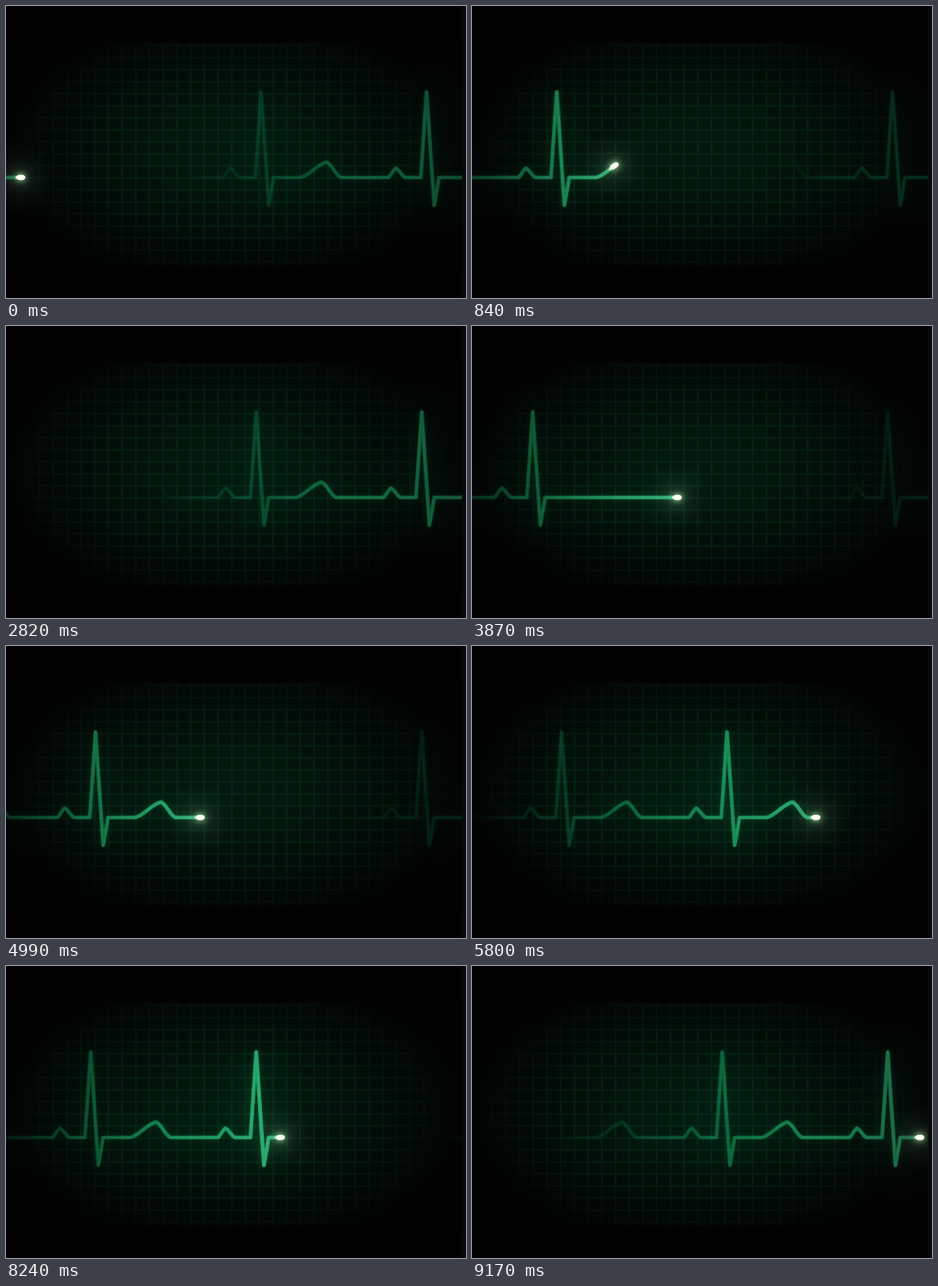
An HTML page with a canvas for the animation above (9.27 s loop, 478 px wide and 304 px high).

```html
<!DOCTYPE html>
<html lang="en">
<head>
<meta charset="utf-8">
<title>Heart monitor</title>
<style>
  html, body { margin: 0; width: 100%; height: 100%; overflow: hidden; background: #020203; }
  .stage { position: relative; width: 478px; height: 304px; overflow: hidden; background: #020203; }
  .screen { position: absolute; left: 0; top: 38px; width: 474px; height: 233px; background: #020404; }
  .edge { position: absolute; left: 474px; top: 0; width: 4px; height: 304px; background: #09090b; }
  .tint, .grid { position: absolute; inset: 0; }
  .tint { background: radial-gradient(ellipse 230px 130px at 238px 112px, #02190f 0, #02150c 35%, #020a06 75%, transparent 100%); }
  .grid {
    opacity: .42;
    background:
      repeating-linear-gradient(90deg, transparent 0 5px, #0d3a25 6.3px 6.9px, transparent 8.2px 14.25px),
      repeating-linear-gradient(180deg, transparent 0 1.6px, #0d3a25 2.9px 3.5px, transparent 4.8px 12.52px);
    -webkit-mask-image: radial-gradient(ellipse 228px 140px at 234px 114px, #000 0, rgba(0,0,0,.8) 55%, rgba(0,0,0,.3) 90%, transparent 100%);
    mask-image: radial-gradient(ellipse 228px 140px at 234px 114px, #000 0, rgba(0,0,0,.8) 55%, rgba(0,0,0,.3) 90%, transparent 100%);
  }
  canvas { position: absolute; left: 0; top: 0; mix-blend-mode: screen; }
</style>
</head>
<body>
<div class="stage">
  <div class="screen"><div class="tint"></div><div class="grid"></div></div>
  <div class="edge"></div>
  <canvas width="478" height="304"></canvas>
</div>
<script>
const ctx = document.querySelector('canvas').getContext('2d');
const LOOP = 9270, FADE = 1950, WIDTH = 474, BASE = 178.5, BEAT = 172;

// Picture changes: [time, equal steps until the next entry]
const ticks = [
  [0, 1], [150, 7], [1140, 1], [1260, 4], [1750, 1], [1890, 3], [2280, 1],
  [2430, 7], [3360, 1], [3490, 3], [3870, 1], [3990, 3], [4420, 1],
  [4570, 7], [5530, 1], [5680, 1], [5800, 1], [5960, 5], [6580, 1],
  [6730, 4], [7220, 1], [7360, 2], [7640, 1], [7790, 3], [8240, 1],
  [8360, 3], [8750, 1], [8900, 2], [9170, 1], [LOOP, 1]
];

// start: time at x = 0, speed: px per ms, peak: x of the first spike
const sweep = (start, speed, peak, flat = false) => ({ start, speed, peak, flat });
const before = sweep(-2934, .19, 93);
const first = sweep(-86, .1851, 88);
const flatline = sweep(2744, .19, 63, true);
const middle = sweep(3916, .19, 93);
const last = sweep(6766, .1938, 88);

// [from, current sweep, fading sweep]
const scenes = [
  [0, first, before],
  [2700, flatline, first],
  [4570, middle, sweep(1134, .19, 88)],
  [6715, last, middle]
];

// One beat, relative to its spike: [dx, height]
const spike = [[-6, 0], [0, 89], [8, -29], [13, 0]];

function bump(d, from, top, to, height) {
  if (d <= from || d >= to) return 0;
  const k = d < top ? (d - from) / (top - from) : (to - d) / (to - top);
  return height * (.45 * k + .55 * Math.sin(k * Math.PI / 2) ** 2);
}

function lift(x, s) {
  let d = x - s.peak;
  if (s.flat && d > 13) return 0;
  d = ((d + 40) % BEAT + BEAT) % BEAT - 40;
  for (let i = 1; i < spike.length; i++) {
    const [x0, y0] = spike[i - 1], [x1, y1] = spike[i];
    if (d >= x0 && d <= x1) return y0 + (y1 - y0) * (d - x0) / (x1 - x0);
  }
  return bump(d, -40, -32, -22, 9.5) + bump(d, 41, 68, 83, 16);
}

function trace(s, from, to) {
  ctx.beginPath();
  ctx.moveTo(from, BASE - lift(from, s));
  for (let x = Math.floor(from) + 1; x < to; x++) ctx.lineTo(x, BASE - lift(x, s));
  ctx.lineTo(to, BASE - lift(to, s));
}

function stroke(style, width, glow, blur) {
  ctx.strokeStyle = style;
  ctx.lineWidth = width;
  ctx.shadowColor = glow;
  ctx.shadowBlur = blur;
  ctx.stroke();
}

// Only the blurred shadow of the path, which itself lies off the canvas
function halo(s, from, to, width, glow, blur) {
  ctx.save();
  ctx.translate(0, -1000);
  ctx.shadowOffsetY = 1000;
  trace(s, from, to);
  stroke('#fff', width, glow, blur);
  ctx.restore();
}

function trail(s, t, from, to) {
  if (to <= from) return;
  const head = (t - s.start) * s.speed;
  const fade = ctx.createLinearGradient(head - FADE * s.speed, 0, head, 0);
  fade.addColorStop(0, 'rgba(14,125,70,0)');
  fade.addColorStop(.25, 'rgba(14,130,72,.17)');
  fade.addColorStop(.55, 'rgba(22,145,84,.42)');
  fade.addColorStop(.8, 'rgba(32,155,96,.62)');
  fade.addColorStop(1, 'rgba(44,168,112,.85)');
  trace(s, from, to);
  stroke(fade, 4.2, 'rgba(0,120,55,.7)', 36);
  stroke(fade, 2.8, 'rgba(0,140,70,.5)', 6);
}

// The screen is dimmer towards its left and right ends
function dimEnds() {
  const shade = ctx.createLinearGradient(0, 0, WIDTH, 0);
  shade.addColorStop(0, 'rgba(0,0,0,.55)');
  shade.addColorStop(.3, '#000');
  shade.addColorStop(.7, '#000');
  shade.addColorStop(1, 'rgba(0,0,0,.55)');
  ctx.shadowColor = 'transparent';
  ctx.globalCompositeOperation = 'destination-in';
  ctx.fillStyle = shade;
  ctx.fillRect(0, 0, WIDTH, 304);
  ctx.globalCompositeOperation = 'source-over';
}

function spot(s, x) {
  halo(s, x - 6, x + 3, 9, 'rgba(165,200,155,.9)', 27);
  trace(s, x - 5, x + 3);
  stroke('#e6f5dc', 2.4, 'rgba(130,235,150,.9)', 8);
  trace(s, x - 2, x + 1);
  stroke('#fbfff2', 5.5, 'rgba(190,240,170,.9)', 6);
}

function draw(t) {
  const [, now, old] = scenes.filter(s => s[0] <= t).pop();
  const x = (t - now.start) * now.speed;
  ctx.clearRect(0, 0, 478, 304);
  ctx.save();
  ctx.beginPath();
  ctx.rect(0, 38, WIDTH, 233);
  ctx.clip();
  ctx.lineJoin = ctx.lineCap = 'round';
  trail(old, t, Math.max(x + 3, -6), WIDTH + 6);
  trail(now, t, -6, Math.min(x, WIDTH + 6));
  dimEnds();
  if (x < WIDTH + 12) spot(now, x);
  ctx.restore();
}

function snap(t) {
  const i = ticks.findIndex(k => k[0] > t) - 1;
  const [a, n] = ticks[i], step = (ticks[i + 1][0] - a) / n;
  return a + Math.floor((t - a) / step) * step;
}

const begin = performance.now();
let shown = -1;
function play() {
  const t = snap((performance.now() - begin) % LOOP);
  if (t !== shown) draw(shown = t);
  requestAnimationFrame(play);
}
play();
</script>
</body>
</html>
```
